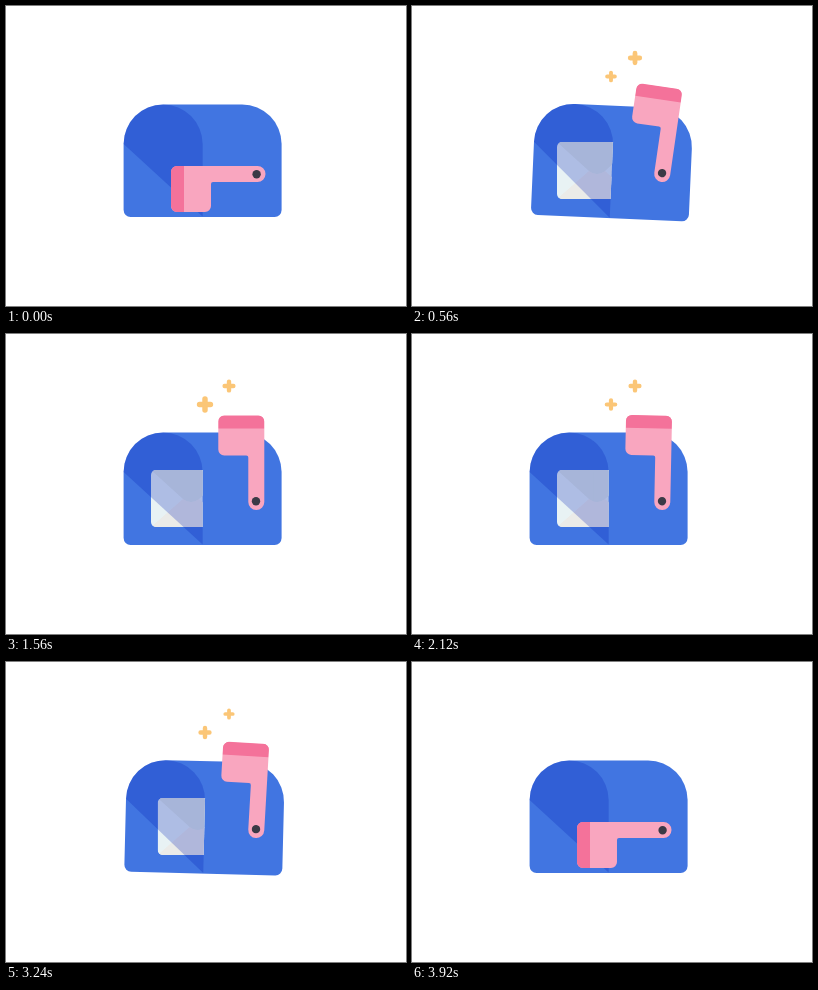
Recreate the animation shown at these times as an HTML page. Size 400 by 300 pixels, loop 4.28 s.

```html
<!DOCTYPE html>
<html lang="en">
<head>
<meta charset="utf-8">
<title>Mailbox</title>
<style>
  html, body { margin: 0; width: 100%; height: 100%; overflow: hidden; background: #fff; }
  svg { display: block; width: 100vw; height: 100vh; }
</style>
</head>
<body>
<svg viewBox="0 0 400 300">
  <defs>
    <clipPath id="opening"><rect x="-200" y="-100" width="397" height="500"/></clipPath>
    <clipPath id="letter"><rect width="80" height="57" rx="5"/></clipPath>
    <clipPath id="paddle"><rect x="165" y="160" width="13" height="46"/></clipPath>
    <path id="flagShape" d="M171 160H251.5a8 8 0 0 1 0 16H207q-2 0-2 2V200a6 6 0 0 1-6 6H171a6 6 0 0 1-6-6V166a6 6 0 0 1 6-6Z"/>
    <path id="plus" d="M-5 0H5M0-5V5" fill="none" stroke="#fbc677" stroke-width="5" stroke-linecap="round"/>
  </defs>

  <g id="trail" fill="none" stroke="#d8bff2" stroke-width="6.5" stroke-linecap="round">
    <path pathLength="100" d="M-20 20.5Q-37 25-50 13"/>
    <path pathLength="100" d="M-18 37Q-40 42-57 32"/>
  </g>

  <g id="box">
    <path d="M157.5 98.5H236.5a39.5 39.5 0 0 1 39.5 39.5V204a7 7 0 0 1-7 7H125a7 7 0 0 1-7-7V138a39.5 39.5 0 0 1 39.5-39.5Z" fill="#4175e1"/>
    <g clip-path="url(#opening)">
      <g id="level">
        <g id="mail">
          <g clip-path="url(#letter)">
            <rect width="80" height="57" fill="#e8f2f4"/>
            <path d="M0 57L32 29H48L80 57Z" fill="#ebebe8"/>
            <path d="M0 0L32 29Q40 35 48 29L80 0Z" fill="#dee8e5"/>
          </g>
        </g>
      </g>
    </g>
    <path d="M118 138a39.5 39.5 0 0 1 79 0V210.5Z" fill="rgba(0,30,178,.25)"/>
  </g>

  <g id="flag">
    <use href="#flagShape" fill="#f9a6bf"/>
    <use href="#flagShape" fill="#f4729a" clip-path="url(#paddle)"/>
    <circle cx="250.6" cy="168.3" r="4.2" fill="#3b3a46"/>
  </g>

  <use id="starA" href="#plus"/>
  <use id="starB" href="#plus"/>
</svg>
<script>
  const LOOP = 4280, STEP = 40, BEAT = 400;
  const $ = id => document.getElementById(id);
  const move = (id, value) => $(id).setAttribute('transform', value);

  const span = (t, a, b) => Math.max(0, Math.min(1, (t - a) / (b - a)));
  const ramp = (t, a) => Math.sin(Math.PI / 2 * span(t, a, a + 160)) ** 2;
  const during = (t, a, b) => ramp(t, a) * (1 - ramp(t, b));
  const hump = (t, a) => Math.sin(Math.PI * span(t, a, a + BEAT)) ** 2;
  const wave = (t, peak) => Math.cos(2 * Math.PI * (t - peak) / BEAT);
  // Damped swing from 0 to 1, starting at time a
  const spring = (t, a) => t < a ? 0 : 1 - Math.exp((a - t) / 75) * Math.cos((t - a) / 65);

  function star(id, x, y, size) {
    move(id, `translate(${x} ${y}) scale(${size / 15})`);
  }

  function draw(t) {
    const lean = 2.6 * hump(t, 3135);
    const tilt = 2.6 * hump(t, 380) + lean;
    move('box', `translate(-.4 0) rotate(${tilt} 172 236)`);
    move('level', `rotate(${-tilt} 172 236)`);

    // The letter swoops in along a parabola, then slips deeper into the box
    const left = Math.pow(1 - span(t, 0, 480), 1.68);
    const x = 145.4 - 230 * left + 60 * span(t, 3150, 3420) ** 2;
    const y = 136 + 85 * left - 113 * left ** 2;
    move('mail', `translate(${x} ${y}) rotate(${14 * left ** 2} 40 28)`);

    const length = 100 * span(t, 120, 280) * (1 - span(t, 380, 500));
    move('trail', `translate(${x} ${y})`);
    $('trail').setAttribute('stroke-dasharray', `${length} 300`);
    $('trail').setAttribute('visibility', length > 0 ? 'visible' : 'hidden');

    const raised = 90 * (spring(t, 400) - spring(t, 3420));
    const sway = 2 * wave(t, 60) * during(t, 600, 3300);
    move('flag', `rotate(${raised + sway + lean} 250.85 167.45)`);

    star('starA', 199, 70.5, (15 + 2.6 * wave(t, 295)) * during(t, 440, 3340));
    star('starB', 223, 52, (14 + 2.8 * wave(t, 240)) * during(t, 420, 3320));
  }

  const start = performance.now();
  function tick() {
    const t = (performance.now() - start) % LOOP;
    draw(Math.floor(t / STEP) * STEP);
    requestAnimationFrame(tick);
  }
  draw(0);
  requestAnimationFrame(tick);
</script>
</body>
</html>
```
